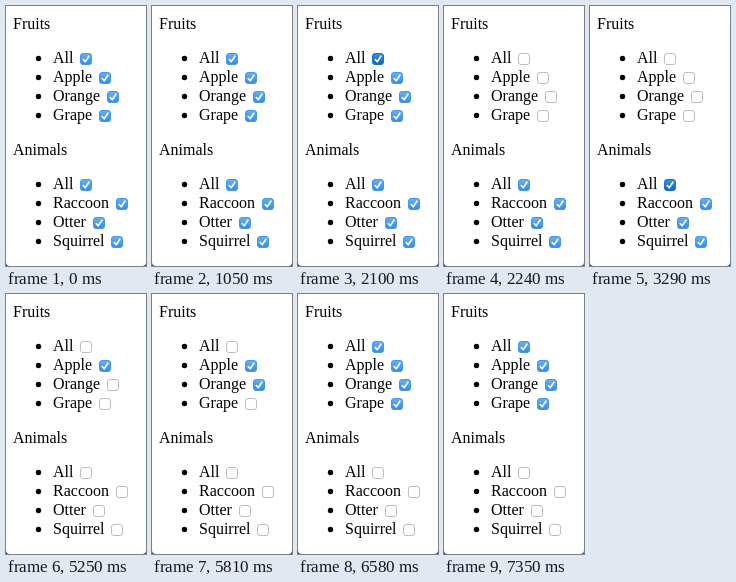
Write an HTML page that moves like this. It is 140 px wide and 260 px high and loops after 8000 ms.

```html
<!DOCTYPE html>
<html lang="en">
<head>
<meta charset="utf-8">
<title>Checkbox groups</title>
<style>
  html, body { margin: 0; width: 100%; height: 100%; overflow: hidden; background: #fff; }
  svg { display: block; width: 100%; height: 100%; }
  text { font: 16px "Liberation Serif", Times, serif; fill: #000; }
</style>
</head>
<body>
<svg id="stage" viewBox="0 0 140 260" xmlns="http://www.w3.org/2000/svg">
  <defs>
    <linearGradient id="blue" x1="0" y1="0" x2="0" y2="1">
      <stop offset="0" stop-color="#66b0f6"/><stop offset="1" stop-color="#338bee"/>
    </linearGradient>
    <linearGradient id="deep" x1="0" y1="0" x2="0" y2="1">
      <stop offset="0" stop-color="#3a8fe4"/><stop offset="1" stop-color="#0c66cc"/>
    </linearGradient>
  </defs>
  <rect width="140" height="260" fill="#fff"/>
  <path d="M0 256V260H4A4 4 0 0 1 0 256ZM140 256V260H136A4 4 0 0 0 140 256Z" fill="#555"/>
</svg>
<script>
const LOOP = 8000;
const stage = document.getElementById('stage');

function add(tag, attrs, label) {
  const el = document.createElementNS('http://www.w3.org/2000/svg', tag);
  for (const key in attrs) el.setAttribute(key, attrs[key]);
  if (label) el.textContent = label;
  stage.appendChild(el);
  return el;
}

// Each item: label and left edge of its checkbox.
const groups = [
  { title: 'Fruits', y: 23, items: [['All', 74], ['Apple', 93], ['Orange', 101], ['Grape', 93]] },
  { title: 'Animals', y: 149, items: [['All', 74], ['Raccoon', 110], ['Otter', 87], ['Squirrel', 105]] }
];

const boxes = [];
for (const { title, y, items } of groups) {
  add('text', { x: 7, y }, title);
  items.forEach(([label, x], i) => {
    const base = y + 34 + 19 * i;
    add('circle', { cx: 32.5, cy: base - 4.5, r: 2.7 });
    add('text', { x: 47, y: base }, label);
    const top = base - 10;
    boxes.push({
      frame: add('rect', { x: x + 0.5, y: top + 0.5, width: 11, height: 11, rx: 2.5 }),
      tick: add('path', {
        d: `M${x + 3.2} ${top + 6.5}L${x + 5.2} ${top + 8.8}L${x + 8.9} ${top + 3.2}`,
        fill: 'none', stroke: '#fff', 'stroke-width': 1.6,
        'stroke-linecap': 'round', 'stroke-linejoin': 'round'
      })
    });
  });
}

// Mouse down, release, and the boxes the release toggles.
const clicks = [
  { down: 2030, up: 2170, box: 0, toggles: [0, 1, 2, 3] },
  { down: 3290, up: 3500, box: 4, toggles: [4, 5, 6, 7] },
  { down: 4620, up: 4760, box: 1, toggles: [1] },
  { down: 5460, up: 5600, box: 2, toggles: [2] },
  { down: 6440, up: 6580, box: 3, toggles: [0, 3] }
];

function render(t) {
  const on = boxes.map(() => true);
  let pressed = -1;
  for (const c of clicks) {
    if (t >= c.up) c.toggles.forEach(i => { on[i] = !on[i]; });
    else if (t >= c.down) pressed = c.box;
  }
  boxes.forEach(({ frame, tick }, i) => {
    const held = i === pressed;
    const fill = on[i] ? (held ? 'url(#deep)' : 'url(#blue)') : (held ? '#e4e4e4' : '#fff');
    const edge = on[i] ? (held ? '#1c6fca' : '#4497ec') : '#bdbdbd';
    frame.setAttribute('fill', fill);
    frame.setAttribute('stroke', edge);
    tick.setAttribute('visibility', on[i] ? 'visible' : 'hidden');
  });
}

const start = performance.now();
function loop() {
  render((performance.now() - start) % LOOP);
  requestAnimationFrame(loop);
}
render(0);
requestAnimationFrame(loop);
</script>
</body>
</html>
```
